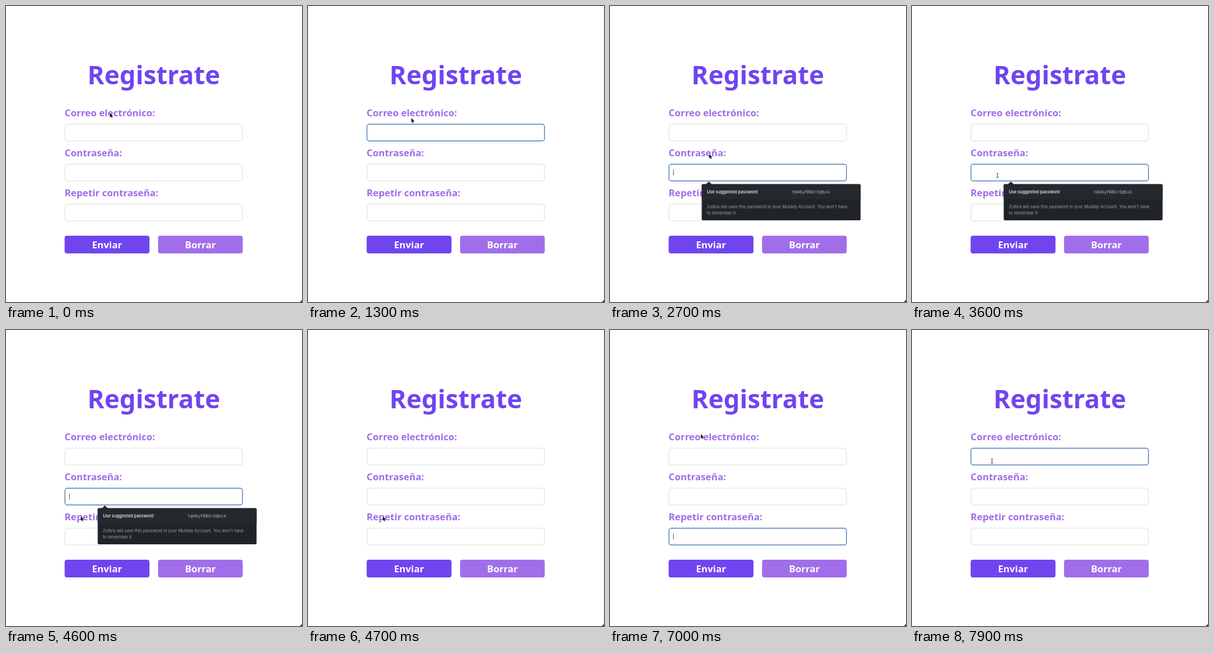
An HTML page that plays this animation: 518x518 px, repeating every 8000 ms.

```html
<!DOCTYPE html>
<html lang="es">
<head>
<meta charset="utf-8">
<title>Registrate</title>
<style>
  html, body { margin: 0; width: 100%; height: 100%; overflow: hidden; background: #fff; }
  svg { display: block; width: 100vw; height: 100vh; }
  .form { font: 700 16.7px "Noto Sans", "Open Sans", sans-serif; }
  .title { font-size: 44.8px; fill: #6f45f0; }
  .label { fill: #a06ce8; }
  .button { fill: #fff; }
  .middle { text-anchor: middle; }
  .field { fill: #fff; stroke: #dcdcde; stroke-width: 1; }
  .field.focus { stroke: #3566ad; stroke-width: 1.2; }
  .popup { font: 400 7.35px Inter, Roboto, sans-serif; fill: #9a9da1; }
  .popup .bright { fill: #f4f5f6; font-weight: 500; }
  .popup .code { font: 7.45px "DejaVu Sans Mono", monospace; fill: #b4b7ba; }
</style>
</head>
<body>
<svg viewBox="0 0 518 518">
  <g class="form">
    <text class="title middle" x="258.7" y="136.8">Registrate</text>
    <g id="fields"></g>
    <rect x="102.6" y="402" width="148.5" height="31" rx="4" fill="#7045f0"/>
    <rect x="266.1" y="402" width="148.2" height="31" rx="4" fill="#a16eea"/>
    <text class="button middle" x="176.8" y="423.8">Enviar</text>
    <text class="button middle" x="340.2" y="423.8">Borrar</text>
  </g>
  <rect id="caret" x="110.6" width="1" height="10.4" fill="#4a4a4a"/>
  <g id="popup" class="popup">
    <path d="M167.5 312.5L173 307L178.5 312.5Z" fill="#24282c"/>
    <rect x="160.5" y="311.8" width="278" height="63.2" rx="2" fill="#202327"/>
    <path d="M160.5 337V313.8a2 2 0 0 1 2-2H436.5a2 2 0 0 1 2 2V337Z" fill="#25292d"/>
    <path d="M160.5 337H438.5" stroke="#34383c" stroke-width=".6"/>
    <text class="bright" x="169.4" y="327.5">Use suggested password</text>
    <text class="code" x="318" y="327.5">t@46yFB8U!E@bik</text>
    <text x="169.4" y="353.6">Zolbra will save this password in your Muldep Account. You won't have</text>
    <text x="169.4" y="365">to remember it.</text>
  </g>
  <path d="M518 513.5V518H513.5Q517 517 518 513.5Z" fill="#222"/>
  <path id="arrow" d="M0 0V7.8L1.7 6.3L2.9 9L4.2 8.4L3 5.7H5.4Z"
        fill="#111" stroke="#fff" stroke-width=".6" paint-order="stroke"/>
  <path id="beam" d="M-2 -4Q-.3 -4 0 -3.2Q.3 -4 2 -4M0 -3.2V3.2M-2 4Q-.3 4 0 3.2Q.3 4 2 4M-1 1.4H1"
        fill="none" stroke="#333" stroke-width=".9"/>
</svg>
<script>
const LOOP = 8000, STEP = 100, BLINK = 504, FIELD_HEIGHT = 29.3;
const labels = ["Correo electrónico:", "Contraseña:", "Repetir contraseña:"];
const fieldTop = i => 206.9 + 70 * i;
const byId = id => document.getElementById(id);

byId("fields").innerHTML = labels.map((label, i) => `
  <text class="label" x="102.6" y="${fieldTop(i) - 14.4}">${label}</text>
  <rect class="field" x="103.2" y="${fieldTop(i)}" width="310.6" height="${FIELD_HEIGHT}" rx="4"/>`).join("");
const fields = document.querySelectorAll(".field");

// The caret starts to blink anew at each entry
const focuses = [
  { field: 0, from: 485, to: 2500 },
  { field: 1, from: 2595, to: 4600 },
  { field: 1, from: 4600, to: 4700 },
  { field: 2, from: 4880, to: 7200 },
  { field: 0, from: 7385, to: LOOP },
];

const smooth = k => k * k * (3 - 2 * k);
const slowDown = k => 1 - (1 - k) ** 2.6;
const home = { x: 182, y: 187 };
const moves = [
  { from: 1100, to: 2000, x: 173.5, y: 259, ease: smooth },
  { from: 3300, to: 4400, x: 131, y: 326, ease: slowDown },
  { from: 6400, to: 7000, x: 159, y: 182, ease: smooth },
  { from: 7600, to: 7900, x: 140, y: 229.5, ease: smooth },
];

function pointerAt(t) {
  let { x, y } = home;
  for (const move of moves) {
    const k = move.ease(Math.min(1, Math.max(0, (t - move.from) / (move.to - move.from))));
    x += (move.x - x) * k;
    y += (move.y - y) * k;
  }
  return { x, y };
}

function show(id, visible) {
  byId(id).style.display = visible ? "" : "none";
}

function render(t) {
  const focus = focuses.find(f => t >= f.from && t < f.to);
  fields.forEach((field, i) => field.classList.toggle("focus", focus?.field === i));

  show("caret", focus && Math.floor((t - focus.from) / BLINK) % 2 === 0);
  if (focus) byId("caret").setAttribute("y", fieldTop(focus.field) + 9.4);
  show("popup", t >= 2700 && t < 4700);

  const { x, y } = pointerAt(t);
  const overField = labels.some((_, i) => y >= fieldTop(i) && y <= fieldTop(i) + FIELD_HEIGHT);
  show("arrow", !overField);
  show("beam", overField);
  for (const id of ["arrow", "beam"]) byId(id).setAttribute("transform", `translate(${x} ${y})`);
}

const start = performance.now();
function tick() {
  const t = (performance.now() - start) % LOOP;
  render(Math.floor(t / STEP) * STEP);
  requestAnimationFrame(tick);
}
tick();
</script>
</body>
</html>
```
